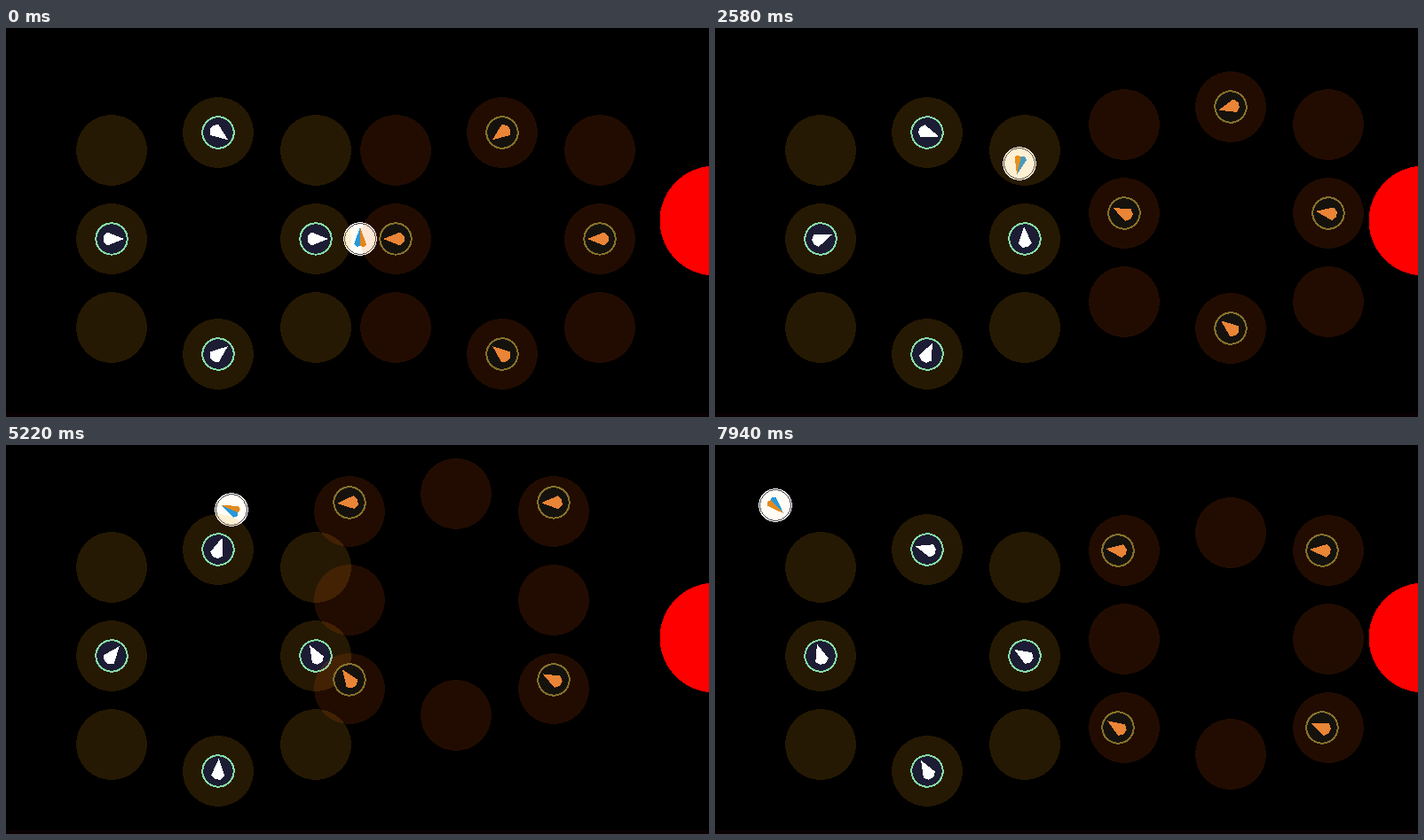
An HTML page that plays this animation: 792 px wide and 439 px high, repeating every 8 s.

```html
<!DOCTYPE html>
<html lang="en">
<head>
<meta charset="utf-8">
<title>Squad chase</title>
<style>
  html, body { margin: 0; width: 100%; height: 100%; overflow: hidden; background: #000; }
  svg { display: block; width: 100vw; height: 100vh; }
</style>
</head>
<body>
<svg id="stage" viewBox="0 0 792 439" shape-rendering="crispEdges">
  <rect width="792" height="439"/>
  <rect y="435" width="792" height="4" fill="#0a0002"/>
  <circle cx="798.5" cy="217.5" r="62" fill="#f00"/>
</svg>
<script>
const LOOP = 8000;
const SQUAD_GAP = 320;
const TRAIL = 70;          // chasers follow their pads this many ms late
const TOP_EDGE = 34;       // chasers stay below this height
const REGROUP_START = 3720, REGROUP_STAGGER = 160, REGROUP_TIME = 800;
const PULSE_START = 3620, PULSE_END = 4180;

const stage = document.getElementById('stage');

// Two columns of three pads, with one more above and one below between them.
const column = x => [-100, 0, 100].map(dy => [x, 238 + dy]);
const [topLeft, left, bottomLeft] = column(119);
const [topRight, right, bottomRight] = column(349);
const top_ = [239, 118], bottom = [239, 368];
const sides = [top_, right, bottom, left];
const corners = [topRight, bottomRight, bottomLeft, topLeft];

// Waypoints: time, x, y and, for the player, heading.
const playerPath = [
  [0, 399, 238, 0], [1460, 389, 198, -138], [2580, 343, 153, -167],
  [3860, 289.5, 114.5, -158], [5220, 254, 73, -67], [6420, 172, 56, 12],
  [7000, 110, 48, 75], [7940, 68, 68, 135]
];
const squadPath = [
  [0, 0, 0], [900, 38, -39], [1200, 50, -8], [1460, 22, -4.5],
  [2450, 22, -29], [2580, 22, -29], [3700, -75, -109], [3860, -75, -109],
  [4900, -52, -109], [5220, -52, -63], [6300, -117, -58], [6420, -117, -58],
  [7500, -22, -19], [7940, 22, -19]
];

const clamp01 = u => Math.min(1, Math.max(0, u));
const mix = (from, to, u) => from.map((v, i) => v + (to[i] - v) * u);

function along(path, t) {
  const next = Math.max(1, path.findIndex(point => point[0] >= t));
  const [a, b] = [path[next - 1], path[next]];
  return mix(a, b, clamp01((t - a[0]) / (b[0] - a[0]))).slice(1);
}

function add(parent, tag, attrs = {}) {
  const el = document.createElementNS('http://www.w3.org/2000/svg', tag);
  for (const name in attrs) el.setAttribute(name, attrs[name]);
  parent.append(el);
  return el;
}

function place(el, x, y, angle = 0) {
  el.setAttribute('transform', `translate(${x} ${y}) rotate(${angle})`);
}

function addPads(fill, opacity) {
  const group = add(stage, 'g', { fill, 'fill-opacity': opacity });
  for (const [cx, cy] of [...sides, ...corners]) add(group, 'circle', { cx, cy, r: 40 });
  return group;
}

function addUnit(body, ring, arrow) {
  const unit = add(stage, 'g');
  add(unit, 'circle', { r: 17.7, fill: body, stroke: ring, 'stroke-width': 2 });
  add(unit, 'path', { d: 'M14 0L-5-7.5L-9.5-3V3L-5 7.5Z', fill: arrow });
  return unit;
}

function addPlayer() {
  const group = add(stage, 'g');
  add(group, 'circle', { r: 18.8, fill: '#fff' });
  add(group, 'circle', { r: 17.3, fill: '#fffdf6', stroke: '#3a3838', 'stroke-width': 0.9 });
  for (const [side, fill] of [[-1, '#2a98d8'], [1, '#e28a1c']]) {
    add(group, 'path', { d: `M0-13L${7 * side} 6L${4 * side} 9L0 8Z`, fill });
  }
  return group;
}

// Painting order matters: the pads tint whatever lies below them.
const player = addPlayer();
addPads('#ffaa14', 0.148);
const guards = sides.map(home => ({ home, el: addUnit('#1c1c34', '#86dda4', '#fff') }));
const squadPads = addPads('#ff5a0a', 0.133);
const pulse = add(stage, 'circle', { r: 149, fill: '#8c2042', 'fill-opacity': 0.18 });
const chasers = sides.map((home, i) => ({
  home, corner: corners[i], el: addUnit('#15120e', '#85712a', '#ea8436')
}));

function render(t) {
  const [px, py, heading] = along(playerPath, t);
  const [padX, padY] = along(squadPath, t);
  const [dx, dy] = along(squadPath, Math.max(0, t - TRAIL));
  const facePlayer = (el, x, y) =>
    place(el, x, y, Math.atan2(py - y, px - x) * 180 / Math.PI);

  place(player, px, py, heading);
  place(squadPads, SQUAD_GAP + padX, padY);
  guards.forEach(({ home, el }) => facePlayer(el, ...home));

  // One after another, the chasers slide clockwise from the sides to the corners.
  chasers.forEach(({ home, corner, el }, i) => {
    const u = clamp01((t - REGROUP_START - i * REGROUP_STAGGER) / REGROUP_TIME);
    const [x, y] = mix(home, corner, u);
    facePlayer(el, x + SQUAD_GAP + dx, Math.max(TOP_EDGE, y + dy));
  });

  place(pulse, left[0] + SQUAD_GAP + dx + 1, left[1] + dy + 1);
  pulse.setAttribute('visibility', t >= PULSE_START && t < PULSE_END ? 'visible' : 'hidden');
}

// The picture holds for 180 ms, then steps every 80 ms.
const stepped = t => t < 180 ? 0 : 180 + Math.floor((t - 180) / 80) * 80;

const start = performance.now();
function tick() {
  render(stepped((performance.now() - start) % LOOP));
  requestAnimationFrame(tick);
}
tick();
</script>
</body>
</html>
```
